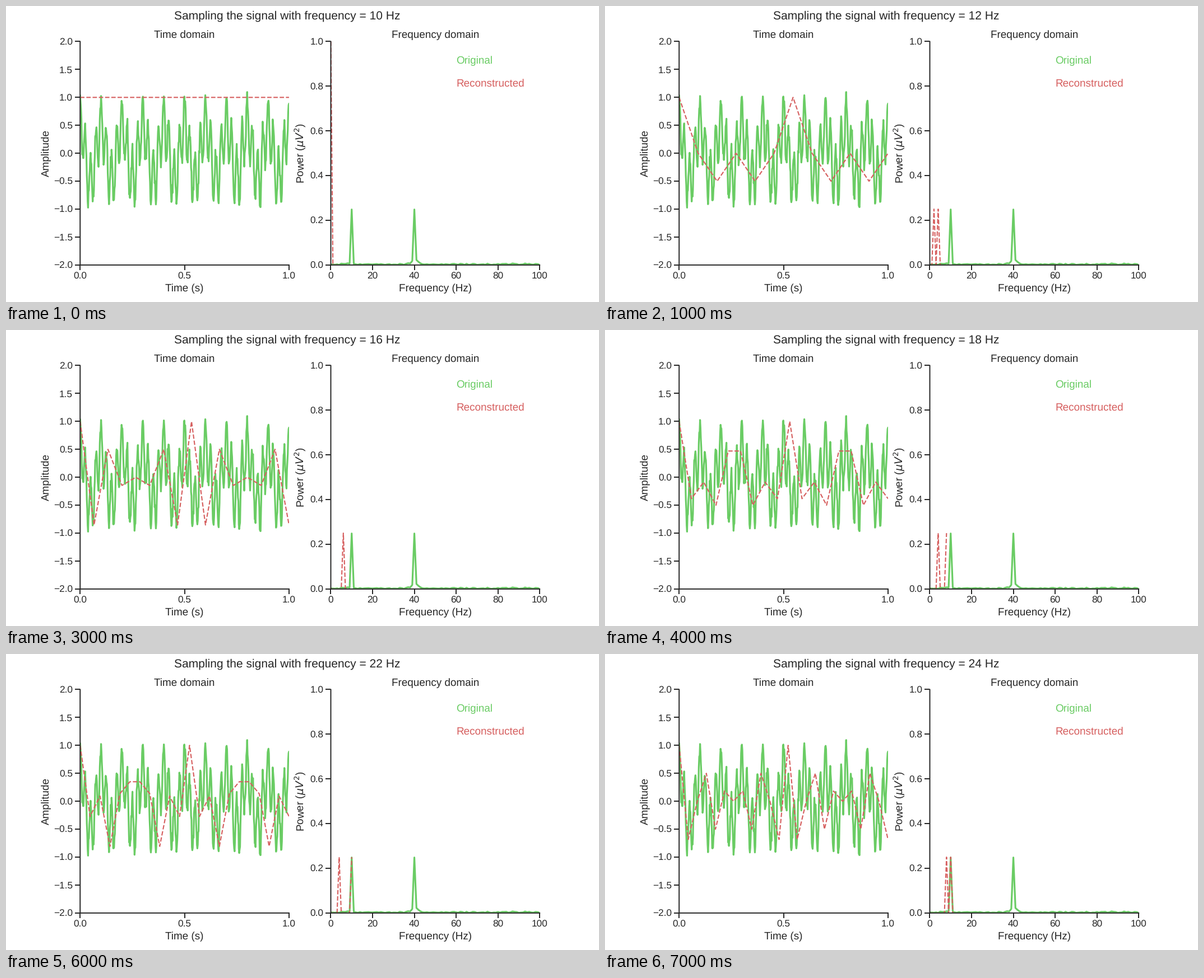
A matplotlib script for the animation above (8 s loop, 1058x529 px).

```python
import matplotlib.pyplot as plt
import numpy as np
from matplotlib.animation import FuncAnimation

GREEN, RED, INK = "#6acc64", "#d65f5f", "0.15"
RATES = range(10, 26, 2)
SAMPLES, NOISE = 500, 0.08

plt.rcParams.update({
    "font.family": "Liberation Sans", "text.color": INK,
    "text.hinting": "no_hinting", "path.snap": False,
    "axes.labelcolor": INK, "axes.edgecolor": INK,
    "xtick.color": INK, "ytick.color": INK,
    "axes.titlesize": 18, "axes.labelsize": 18,
    "xtick.labelsize": 16.5, "ytick.labelsize": 16.5,
    "axes.linewidth": 1.875, "lines.solid_capstyle": "round",
    "xtick.major.width": 1.875, "ytick.major.width": 1.875,
    "xtick.major.size": 9, "ytick.major.size": 9,
    "axes.spines.top": False, "axes.spines.right": False,
})


def wave(t):
    return 0.5 * np.cos(20 * np.pi * t) + 0.5 * np.cos(80 * np.pi * t)


def spectrum(values):
    """One-sided magnitudes below half the sampling rate."""
    return np.abs(np.fft.fft(values))[:len(values) // 2] / len(values)


fig, (time_ax, freq_ax) = plt.subplots(1, 2, figsize=(14, 7), dpi=1058 / 14)
fig.subplots_adjust(left=0.125, right=0.9, bottom=0.125, top=0.88, wspace=0.2)
heading = fig.text(0.474, 0.9546, "", size=20, ha="center", va="baseline")

time_ax.set(title="Time domain", xlabel="Time (s)", ylabel="Amplitude",
            xlim=(0, 1), ylim=(-2, 2),
            xticks=[0, 0.5, 1], yticks=np.arange(-2, 2.1, 0.5))
freq_ax.set(title="Frequency domain", xlabel="Frequency (Hz)",
            ylabel=r"Power ($\mu V^2$)", xlim=(0, 100), ylim=(0, 1),
            xticks=range(0, 101, 20), yticks=np.arange(0, 1.1, 0.2))

t = np.linspace(0, 1, SAMPLES)
signal = wave(t) + np.random.RandomState(42).normal(0, NOISE, SAMPLES)
time_ax.plot(t, signal, color=GREEN, lw=3)
freq_ax.plot(spectrum(signal), color=GREEN, lw=3)
time_line, = time_ax.plot([], [], "--", color=RED, lw=2)
freq_line, = freq_ax.plot([], [], "--", color=RED, lw=2)
freq_ax.text(60, 0.9, "Original", color=GREEN, size=18)
freq_ax.text(60, 0.8, "Reconstructed", color=RED, size=18)


def update(step):
    rate = RATES[step]
    values = wave(np.arange(rate) / rate)
    power = spectrum(values)
    heading.set_text(f"Sampling the signal with frequency = {rate} Hz")
    time_line.set_data(np.linspace(0, 1, rate), values)
    freq_line.set_data(np.arange(power.size), power)
    return heading, time_line, freq_line


anim = FuncAnimation(fig, update, frames=len(RATES), interval=1000, repeat=True)
plt.show()
```
